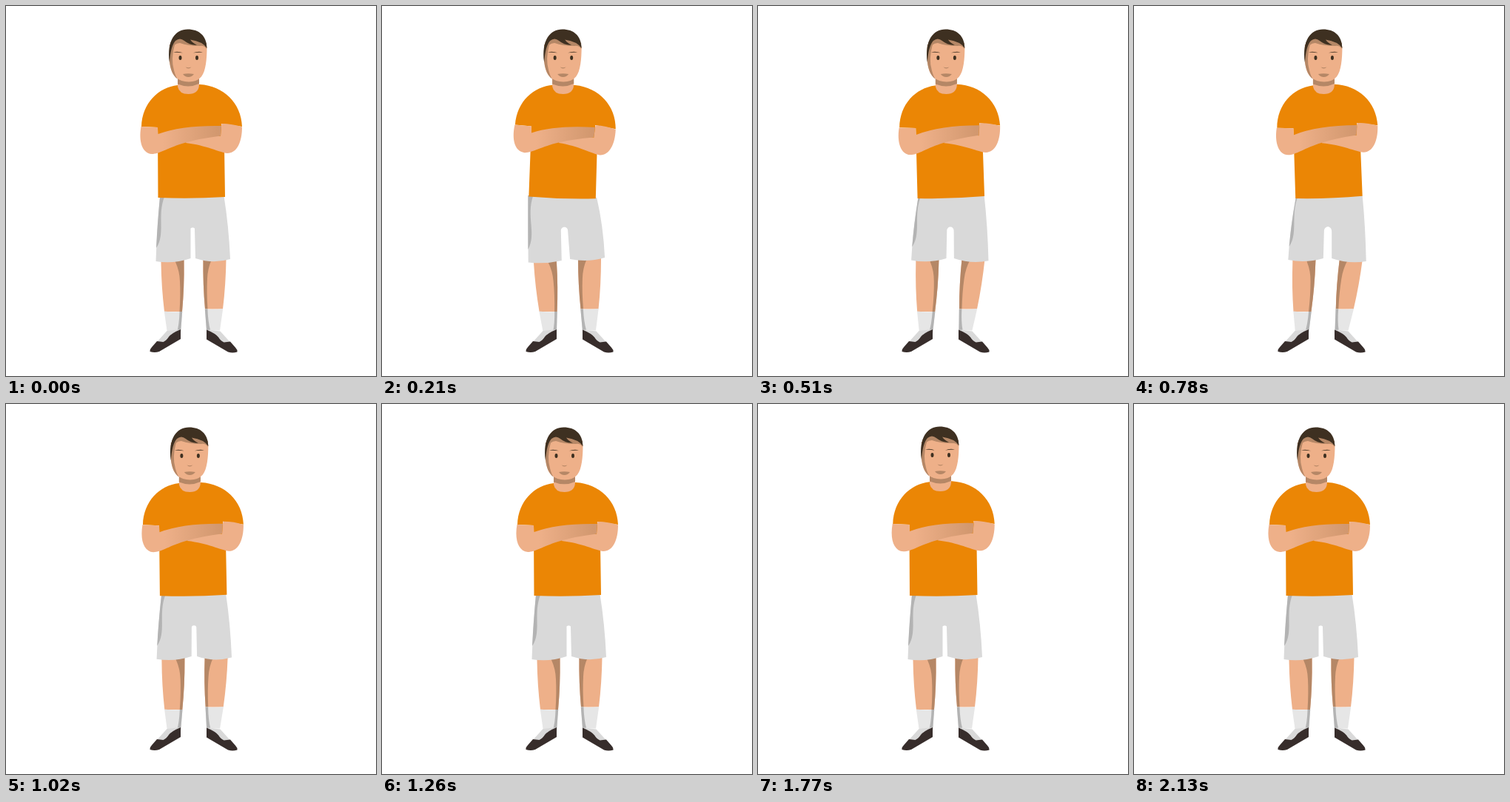
These frames come from a looping animation (500 px wide and 500 px high, 3.3 s). An HTML page:

```html
<!DOCTYPE html>
<html lang="en">
<head>
<meta charset="utf-8">
<title>Standing man</title>
<style>
  html, body { margin: 0; width: 100%; height: 100%; overflow: hidden; background: #fff; }
  svg { display: block; width: 100%; height: 100%; }
  .skin { fill: #eeb089; }
  .shade { fill: #b58766; }
  .hair { fill: #3e3021; }
  .shoe { fill: #372d2b; }
  .sock { fill: #e6e6e6; }
  .tongue { fill: #d9d9d9; }
  .grey { fill: #b3b3b3; }
  .shirt { fill: #eb8605; }
</style>
</head>
<body>
<svg viewBox="0 0 500 500">
  <defs>
    <linearGradient id="forearm" gradientUnits="userSpaceOnUse" x1="212" y1="0" x2="286" y2="0">
      <stop offset="0" stop-color="#eeb089"/>
      <stop offset="1" stop-color="#d2986f"/>
    </linearGradient>
    <g id="limb">
      <path class="skin" d="M209 335L209.500 346Q210 380 214 413L238 413Q241 380 240.500 346V335Z"/>
      <path class="shade" d="M228 335L229 346Q234.500 358 235 372Q236 390 234.500 413H238Q241 380 240.500 346V335Z"/>
      <path class="sock" d="M213.800 412.500Q226 414 238.200 413L236 442H218Z"/>
      <path class="grey" d="M234.600 413H238.200L236 442L231 441Q234 430 234.600 413Z"/>
    </g>
    <g id="shoe">
      <path class="tongue" d="M217.500 439L236 437L218 455H203Z"/>
      <path class="shoe" d="M236 437V450L207 467Q201 469 194.500 467Q194 464 197 461L204 453L212.500 454Q217 452 220 447Q224 442 236 437Z"/>
    </g>
  </defs>

  <g id="leftLeg"><use href="#limb"/></g>
  <use href="#shoe"/>
  <g transform="matrix(-1 0 0 1 507 0)">
    <g id="rightLeg"><use href="#limb" y="-3.500"/></g>
    <use href="#shoe" y="0.500"/>
  </g>

  <path id="shorts" fill="#d9d9d9"/>
  <path id="fold" class="grey"/>

  <g id="torso">
    <path class="shirt" d="M232 107C206 110 184 131 183 163L205 164L205.500 259Q250 261 296 258L295 190L291 159L319 163C318 131 294 108 262 106Z"/>
    <path class="skin" d="M291.500 159Q306 159 319 163.500C319 184 312 199 299 199C289 198 270 188 243 185L250 170L290 176Z"/>
    <path fill="url(#forearm)" d="M182.500 163L205 164L205.500 173Q238 161 291 162L290 175.500Q262 179 243 184.500C219 191 208 200 197 200C184 199 179 183 182.500 163Z"/>
  </g>

  <g id="head">
    <path class="skin" d="M232 92V109Q234 119 246.500 119Q260 119 261 107V92Z"/>
    <path class="shade" d="M232 95H261V105Q247 111.500 232 105.500Z"/>
    <path class="skin" d="M221 55C220 75 222 90 229 96Q236 102.500 247 102.500Q258 102.500 264 95.500C270 88 271.500 72 271.500 55L260 42H230Z"/>
    <path class="shade" d="M221 52H228Q222.500 72 227 87Q229 95 232 99Q221.500 91 220.500 70Z"/>
    <path class="shade" d="M225 60Q226 50 235 50Q246 54 262 54Q268 53 271 58V50L255 40H230L222 50Z"/>
    <path class="hair" d="M221 76C217 46 229 31.500 245.500 31.500C261 31.500 271 40 271.500 57Q266 48 249 45.500Q252 50 258 52.500Q249 53.500 241 47Q235 42 229 47Q222.500 54 221 76Z"/>
    <path class="hair" d="M226 62.500Q232 60.500 239 63.300Q232 62.800 226 62.500ZM253 63.300Q260 60.500 266 62.500Q260 62.800 253 63.300Z"/>
    <ellipse class="hair" cx="235.500" cy="70" rx="2" ry="3"/>
    <ellipse class="hair" cx="258" cy="70" rx="2" ry="3"/>
    <path class="shade" d="M242.500 82.500Q246.500 84 250.500 82.500Q246.500 86.500 242.500 82.500Z"/>
    <path class="shade" d="M239 92Q246 90.500 254 92Q251 96 246.500 96Q242 96 239 92Z"/>
  </g>
</svg>
<script>
const LOOP = 3300, STEP = 30;
const el = id => document.getElementById(id);
const progress = (t, from, to) => Math.min(1, Math.max(0, (t - from) / (to - from)));
const smooth = u => (1 - Math.cos(Math.PI * u)) / 2;
const fastStart = u => 1 - (1 - u ** 1.3) ** 3;

// -1 leans to the left of the stage, 1 to the right
function leanAt(t) {
  if (t < 300) return -smooth(progress(t, 0, 240));
  if (t < 740) return -1 + 2 * fastStart(progress(t, 300, 650));
  return 1 - smooth(progress(t, 740, 1130));
}

const breathAt = t => Math.sin(Math.PI * progress(t, 1230, 2130)) ** 2;

function draw(t) {
  const lean = leanAt(t), breath = breathAt(t);
  const pose = (rest, left, right) =>
    +(rest + Math.abs(lean) * ((lean < 0 ? left : right) - rest)).toFixed(2);
  const move = (id, value) => el(id).setAttribute("transform", value);
  const skewLeg = (id, shift) => {
    const k = shift / 98;
    move(id, `matrix(1 0 ${-k} 1 ${443 * k} 0)`);
  };

  skewLeg("leftLeg", pose(0, -4.8, 5));
  skewLeg("rightLeg", pose(0, 1.5, -11.3));

  const grow = 1 + 0.012 * breath;
  move("torso", `translate(${pose(0, -1.2, 9.3)} ${pose(0, 0.5, 0)}) rotate(${pose(0, 2.5, -1.5)} 251 115)
    translate(251 259) scale(${grow}) translate(-251 -259)`);
  move("head", `translate(${pose(0, -1.9, 10.2)} ${-breath})`);

  const waistX = pose(208, 197, 219), waistY = pose(258, 256, 259);
  const hemX = pose(202.5, 197.5, 208.5), hemY = pose(345, 346.5, 343);
  const innerL = pose(249.5, 242.5, 256), innerR = pose(256, 254, 267.5);
  const innerLY = pose(341, 344, 341);
  const gapL = pose(249.5, 241.5, 257), gapR = pose(255, 251, 267.5);
  const gapY = pose(301, 304, 305), gapTop = pose(299, 297, 296);
  const outerX = pose(303, 301, 314), outerY = pose(342, 340, 345);
  const hipX = pose(294.5, 290, 309), hipY = pose(257, 259, 256);
  el("shorts").setAttribute("d",
    `M${waistX} ${waistY}Q${pose(204, 197, 211)} 300 ${hemX} ${hemY}
     Q${(hemX + innerL) / 2} ${pose(349, 349, 348)} ${innerL} ${innerLY}
     L${gapL} ${gapY}C${gapL} ${gapTop} ${gapR} ${gapTop} ${gapR} ${gapY}
     L${innerR} ${pose(341, 342, 341)}
     Q${(innerR + outerX) / 2} ${pose(349, 347, 349)} ${outerX} ${outerY}
     Q${pose(301, 299, 313)} 297 ${hipX} ${hipY}Z`);
  el("fold").setAttribute("d",
    `M${waistX} ${waistY}L${pose(214, 204, 221)} ${waistY}
     C${pose(204, 194, 212)} 284 ${pose(216, 209, 222)} 308 ${pose(203, 197.2, 209.8)} ${pose(327, 329, 325)}
     Q${pose(204.5, 197, 212.5)} 295 ${waistX} ${waistY}Z`);
}

const start = performance.now();
function frame() {
  const t = (performance.now() - start) % LOOP;
  draw(Math.floor(t / STEP) * STEP);
  requestAnimationFrame(frame);
}
frame();
</script>
</body>
</html>
```
